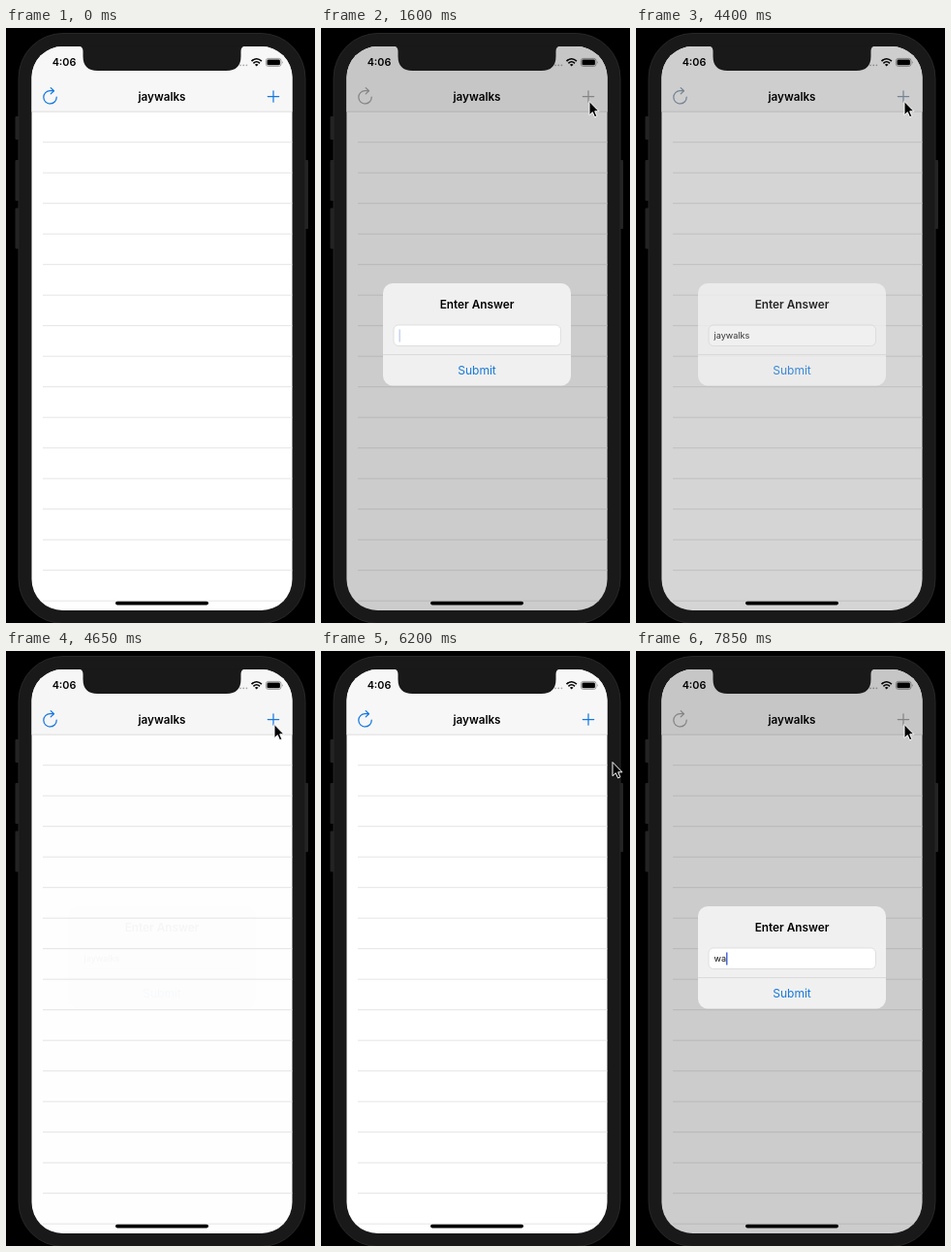
Write an HTML page that moves like this. It is 319 by 613 pixels and loops after 8 s.

```html
<!DOCTYPE html>
<html lang="en">
<head>
<meta charset="utf-8">
<title>Word game</title>
<style>
  html, body { margin: 0; width: 100%; height: 100%; overflow: hidden; background: #000; }
  svg { display: block; width: 100%; height: 100%; font-family: Inter, Roboto, sans-serif; }
  .bold { font-weight: 600; }
  .mid { text-anchor: middle; }
  .icon { fill: none; stroke-width: 1.25; stroke-linecap: round; stroke-linejoin: round; }
</style>
</head>
<body>
<svg viewBox="0 0 319 613">
  <defs>
    <clipPath id="screen"><rect x="26.5" y="19" width="269" height="581" rx="32"/></clipPath>
  </defs>
  <rect width="319" height="613"/>
  <g fill="#232323">
    <rect x="9.5" y="91" width="5" height="24" rx="1"/>
    <rect x="9.5" y="136" width="5" height="42" rx="1"/>
    <rect x="9.5" y="185.500" width="5" height="42" rx="1"/>
    <rect x="307" y="136" width="5" height="71" rx="1"/>
  </g>
  <rect x="13" y="5.500" width="296" height="608" rx="46" fill="#191919" stroke="#272727"/>

  <g clip-path="url(#screen)">
    <rect x="26" y="19" width="270" height="582" fill="#fff"/>
    <rect x="26" y="19" width="270" height="67" fill="#f7f7f7"/>
    <path d="M26 86.200H296" stroke="#d6d6d6" stroke-width=".8"/>
    <g id="lines" stroke="#e3e3e3" stroke-width=".9"></g>
    <text class="bold mid" x="60" y="39.300" font-size="10.800">4:06</text>
    <text class="bold mid" x="161" y="74.800" font-size="11.700">jaywalks</text>
    <g fill="#aaa">
      <circle cx="239" cy="38.300" r=".9"/><circle cx="242" cy="38.300" r=".9"/>
      <circle cx="245.200" cy="38.300" r=".9"/><circle cx="248.400" cy="38.300" r=".9"/>
    </g>
    <g fill="none" stroke="#000" stroke-width="1.600">
      <path d="M253.500 34.200Q258.700 29.300 263.900 34.200"/>
      <path d="M255.400 36.300Q258.700 33.200 262 36.300"/>
    </g>
    <path d="M256.900 37.700Q258.700 36.300 260.500 37.700L258.700 39.600Z"/>
    <rect x="268.400" y="31.400" width="15.600" height="8" rx="2.300" fill="none" stroke="#888" stroke-width=".8"/>
    <rect x="269.500" y="32.500" width="13.400" height="5.800" rx="1.300"/>
    <path d="M285 34Q286.400 35.400 285 36.800Z" fill="#888"/>
    <path id="reload" class="icon" d="M52.200 71.200A6.700 6.700 0 1 1 45.500 64.600H49.300M46.200 61.600L49.500 64.700L46.200 67.900"/>
    <path id="plus" class="icon" d="M270.300 70.500H281.700M276 64.800V76.200"/>
    <rect id="dim" x="26" y="19" width="270" height="582"/>
    <rect x="113" y="590.800" width="96" height="3.600" rx="1.800"/>
  </g>
  <path d="M75 18.500Q79.500 19 79.500 24V29Q79.500 44 94.500 44H227.500Q242.500 44 242.500 29V24Q242.500 19 247 18.500Z" fill="#191919"/>

  <g id="answer">
    <rect x="64" y="263" width="194" height="105.500" rx="10" fill="#f0f0f0"/>
    <text class="bold mid" x="161" y="288.600" font-size="11.800">Enter Answer</text>
    <rect id="field" x="75" y="306" width="172.500" height="21.500" rx="5" fill="#fff"/>
    <rect x="75" y="306" width="172.500" height="21.500" rx="5" fill="none" stroke="#d9d9db" stroke-width=".8"/>
    <text id="typed" x="80.500" y="320.300" font-size="9.100" fill="#111"></text>
    <rect id="caret" y="310.500" width="1.400" height="13" fill="#3f5fd0"/>
    <path d="M64 336.600H258" stroke="#d2d2d4" stroke-width=".8"/>
    <text class="mid" x="161" y="357" font-size="12" fill="#1778d8">Submit</text>
  </g>

  <g id="notice">
    <rect x="64" y="271" width="194" height="89" rx="10" fill="#f0f0f0"/>
    <path id="pressed" d="M64 328.600H258V350Q258 360 248 360H74Q64 360 64 350Z" fill="#dcdcdc"/>
    <text class="bold mid" x="161" y="296.700" font-size="11.700">Word not possible</text>
    <text class="mid" x="161" y="311.200" font-size="9.100">You can't spell that word from jaywalks</text>
    <path d="M64 328.600H258" stroke="#d2d2d4" stroke-width=".8"/>
    <text class="mid" x="161" y="349" font-size="12" fill="#1778d8">OK</text>
  </g>

  <path id="pointer" d="M0 0V14.200L3.300 11.200L5.600 16.400L7.900 15.400L5.700 10.300H10Z" stroke="#fff" stroke-width="1" stroke-linejoin="round"/>
</svg>
<script>
const LOOP = 8000, TICK = 50;
const el = id => document.getElementById(id);
const [lines, reload, plus, dim, answer, field, typed, caret, notice, pressed, pointer] =
  ['lines', 'reload', 'plus', 'dim', 'answer', 'field', 'typed', 'caret', 'notice', 'pressed', 'pointer'].map(el);

for (let i = 0; i < 16; i++) {
  const row = document.createElementNS('http://www.w3.org/2000/svg', 'path');
  row.setAttribute('d', `M38 ${117.7 + i * 31.5}H296`);
  lines.append(row);
}

const clamp = x => Math.max(0, Math.min(1, x));
const mix = (a, b, k) => a + (b - a) * k;
const between = (t, a, b) => t >= a && t < b;
const appear = (t, start, span = 350) => 1 - (1 - clamp((t - start) / span)) ** 3;
const remain = (t, start) => (1 - clamp((t - start) / 320)) ** 1.5;

// [time, x, y] of the pointer tip
const route = [
  [500, 296, 104], [850, 277, 75.5], [4900, 277, 75.5], [5150, 211, 240],
  [5450, 166, 342], [5750, 166, 342], [6200, 301, 114.5], [6600, 277, 75.5]
];
// [time, letters shown]
const keys = [
  [1800, 1], [2200, 2], [2350, 3], [3000, 4], [3200, 5], [3800, 6], [4100, 7], [4300, 8]
];

function pointerAt(t) {
  const next = route.findIndex(p => p[0] > t);
  if (next < 0) return route.at(-1).slice(1);
  const [t0, x0, y0] = route[Math.max(0, next - 1)], [t1, x1, y1] = route[next];
  const u = clamp((t - t0) / (t1 - t0));
  const k = t0 === 4900 || t0 === 5150 ? u : 1 - (1 - u) ** 2;
  return [mix(x0, x1, k), mix(y0, y1, k)];
}

function textAt(t) {
  if (t >= 6600) return 'wa'.slice(0, t >= 7850 ? 2 : t >= 7800 ? 1 : 0);
  const last = keys.findLast(k => k[0] <= t);
  return 'jaywalks'.slice(0, last ? last[1] : 0);
}

function caretAt(t) {
  if (between(t, 1550, 1800)) return t < 1600 ? 0.65 : 0.3;
  if (between(t, 7400, 7650)) return Math.max(0, 1 - (t - 7350) / 150);
  return between(t, 4350, 6600) ? 0 : 1;
}

function showAlert(node, opening, level, cy) {
  const s = 1 + 0.15 * (1 - opening);
  node.setAttribute('opacity', level);
  node.setAttribute('transform', `translate(161 ${cy}) scale(${s}) translate(-161 ${-cy})`);
}

function tint(k) {
  const c = [[20, 120, 226], [165, 165, 165]];
  return `rgb(${c[0].map((v, i) => Math.round(mix(v, c[1][i], k)))})`;
}

function draw(t) {
  const second = t >= 6600;
  const opening = appear(t, second ? 6830 : 1020);
  const held = between(t, 4650, 4950) ? 4650 : t;
  const leaving = second ? 1 : remain(held, 4360);
  const answerLevel = opening * leaving;
  const noticeOpening = appear(t, 4900, 300);
  const noticeLevel = t < 4950 ? 0 : noticeOpening * remain(t, 5720);
  const level = Math.max(answerLevel, noticeLevel);

  showAlert(answer, opening, answerLevel, 316);
  showAlert(notice, noticeOpening, noticeLevel, 315.5);
  field.setAttribute('opacity', leaving ** 4);
  dim.setAttribute('opacity', 0.2 * level);
  reload.setAttribute('stroke', tint(level));
  plus.setAttribute('stroke', tint(level));
  plus.setAttribute('opacity', between(t, 850, 1050) || between(t, 6650, 6850) ? 0.35 : 1);
  pressed.setAttribute('opacity', between(t, 5550, 5700) ? 1 : 0);

  const word = textAt(t);
  typed.textContent = word;
  caret.setAttribute('x', 80.5 + (word ? typed.getComputedTextLength() : 0));
  caret.setAttribute('opacity', caretAt(t));

  pointer.setAttribute('visibility', t < 500 ? 'hidden' : 'visible');
  pointer.setAttribute('transform', `translate(${pointerAt(t)})`);
}

const start = performance.now();
function loop() {
  const t = (performance.now() - start) % LOOP;
  draw(Math.floor(t / TICK) * TICK);
  requestAnimationFrame(loop);
}
loop();
</script>
</body>
</html>
```
